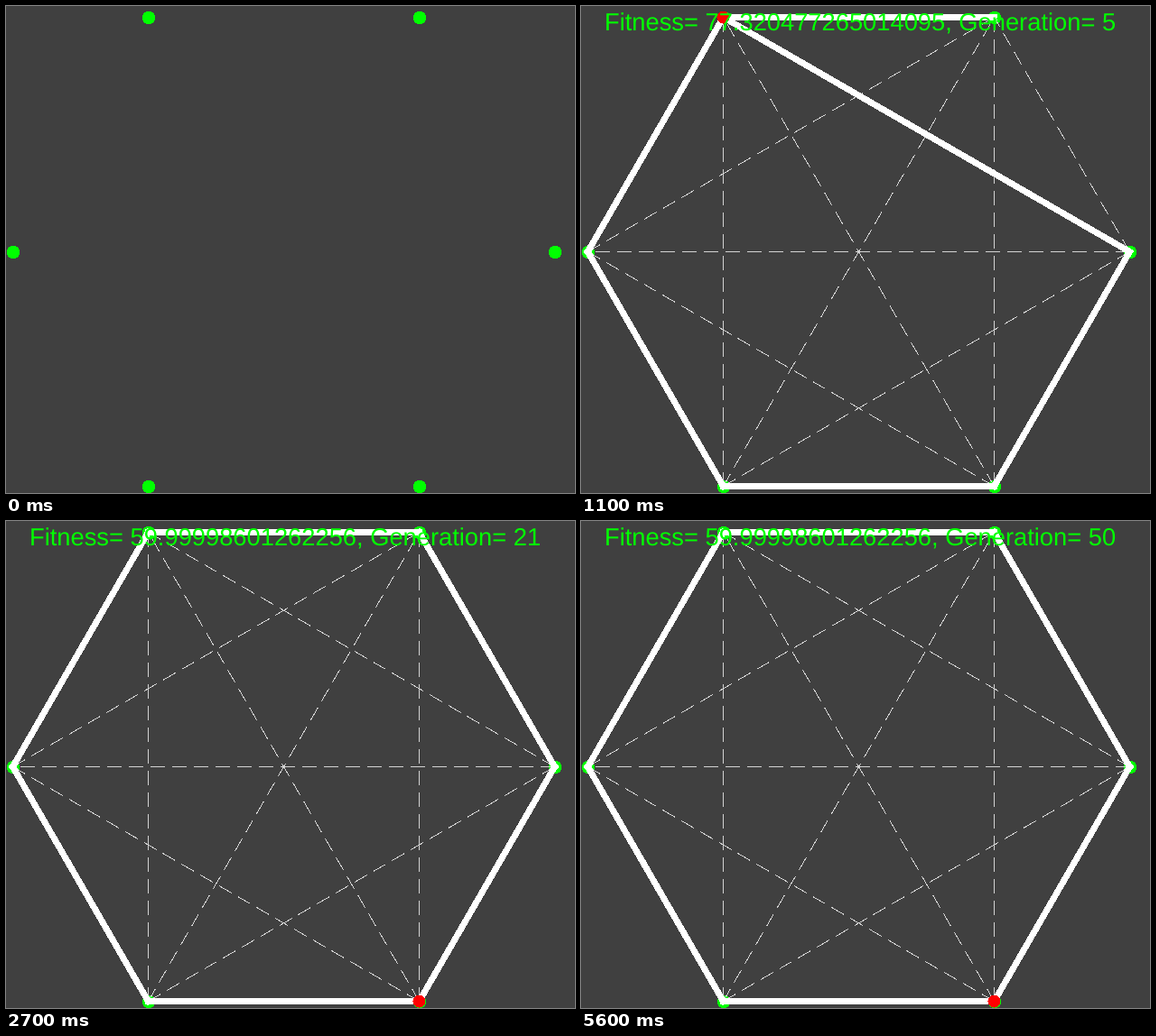
An HTML page for the animation above (5700 ms loop, 630x540 px).

```html
<!DOCTYPE html>
<html lang="en">
<head>
<meta charset="utf-8">
<title>Shortest route search</title>
<style>
  html, body { margin: 0; width: 100%; height: 100%; overflow: hidden; background: #404040; }
  svg { display: block; width: 630px; height: 540px; shape-rendering: crispEdges; }
  .link { stroke: #d3d3d3; stroke-width: 1; stroke-dasharray: 16 8; }
  .route { stroke: #fff; stroke-width: 7; stroke-linecap: square; }
  .node { fill: #0f0; }
  .start { fill: #f00; }
  text { font: 27.3px "Liberation Sans", Arial, sans-serif; fill: #0f0;
         text-rendering: geometricPrecision; white-space: pre; }
</style>
</head>
<body>
<svg viewBox="0 0 630 540">
  <g id="nodes"></g>
  <g id="links"></g>
  <g id="search">
    <g id="routes"></g>
    <circle id="start" class="start" r="7"/>
    <text id="label" x="26" y="26.8"></text>
  </g>
</svg>
<script>
const LOOP = 5700, LINKS_AT = 200, SEARCH_AT = 700, STEP = 100;
const $ = id => document.getElementById(id);

// Corners of the hexagon, clockwise from the upper left
const points = {
  A: [157.5, 12.5], B: [457.5, 12.5], C: [607.5, 272.5],
  D: [457.5, 532.5], E: [157.5, 532.5], F: [7.5, 272.5]
};

// Best closed walk from each generation on; it starts at its first letter
const walks = [
  { from: 1, path: 'DFACABEAFED', fitness: '139.28193238492247' },
  { from: 3, path: 'DCABEAFED', fitness: '104.64095453002817' },
  { from: 5, path: 'ABACDEFA', fitness: '77.320477265014095' },
  { from: 9, path: 'BCEDEFAB', fitness: '77.32047726501409' },
  { from: 15, path: 'DEFABCD', fitness: '59.99998601262256' }
];

function add(parent, tag, attrs) {
  const el = document.createElementNS('http://www.w3.org/2000/svg', tag);
  for (const key in attrs) el.setAttribute(key, attrs[key]);
  return parent.appendChild(el);
}

function addLine(parent, from, to, cls) {
  const [x1, y1] = points[from], [x2, y2] = points[to];
  add(parent, 'line', { x1, y1, x2, y2, class: cls });
}

const order = 'CDEFAB';
[...order].forEach((a, i) => {
  const [x, y] = points[a];
  add($('nodes'), 'circle', { cx: x + 0.5, cy: y + 0.5, r: 7.3, class: 'node' });
  for (const b of order.slice(i + 1)) addLine($('links'), a, b, 'link');
});

for (const walk of walks) {
  walk.group = add($('routes'), 'g', {});
  for (let i = 1; i < walk.path.length; i++)
    addLine(walk.group, walk.path[i - 1], walk.path[i], 'route');
}

const show = (el, on) => { el.style.display = on ? '' : 'none'; };

function draw() {
  const t = performance.now() % LOOP;
  show($('links'), t >= LINKS_AT);
  show($('search'), t >= SEARCH_AT);
  if (t >= SEARCH_AT) {
    const generation = Math.floor((t - SEARCH_AT) / STEP) + 1;
    const best = walks.filter(w => w.from <= generation).pop();
    for (const walk of walks) show(walk.group, walk === best);
    const [x, y] = points[best.path[0]];
    $('start').setAttribute('cx', x);
    $('start').setAttribute('cy', y);
    $('label').textContent = `Fitness= ${best.fitness}, Generation= ${generation}`;
  }
  requestAnimationFrame(draw);
}
draw();
</script>
</body>
</html>
```
